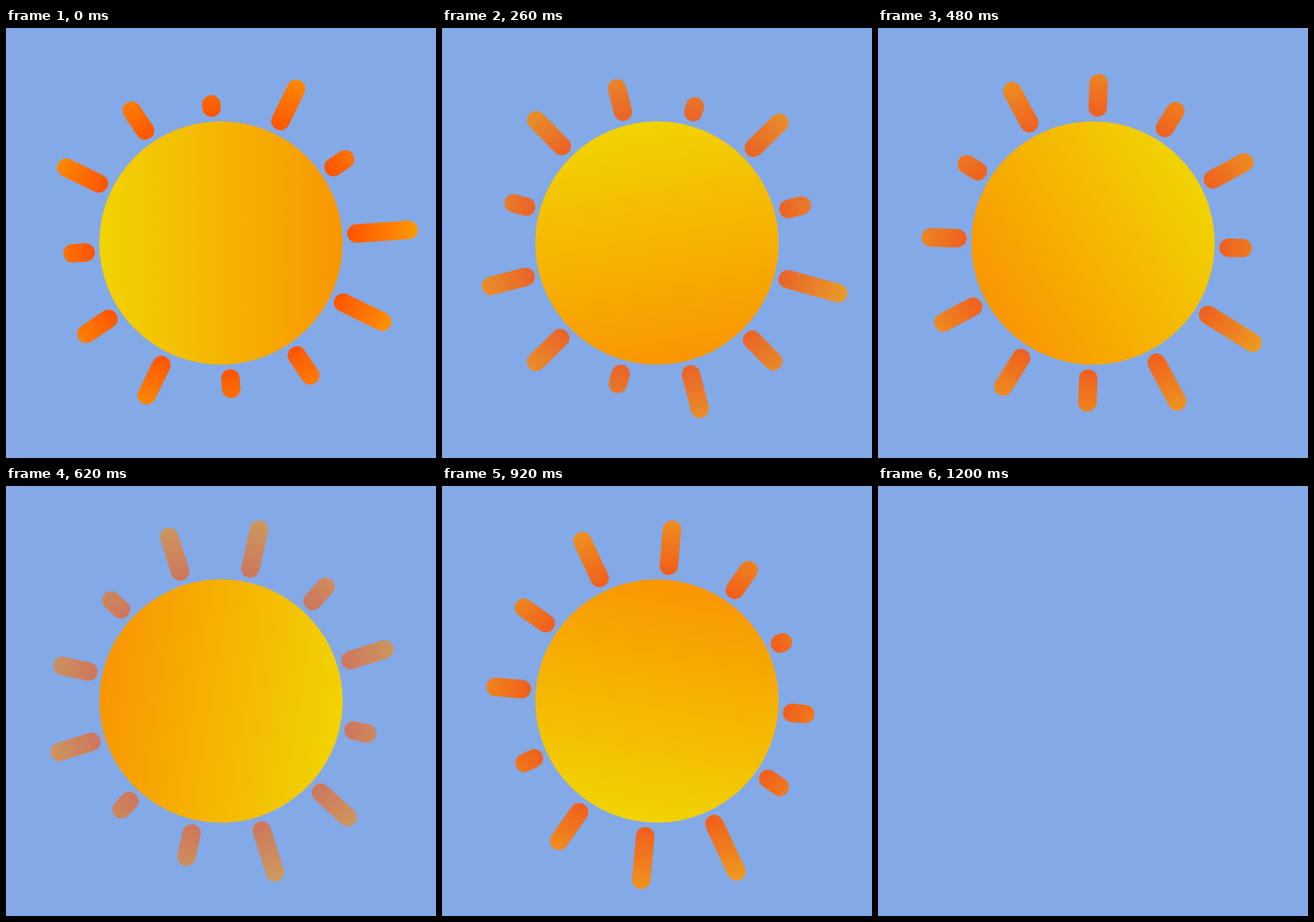
Write an HTML page with a canvas that moves like this. It is 500x500 px and loops after 1220 ms.

```html
<!DOCTYPE html>
<html lang="en">
<head>
<meta charset="utf-8">
<title>Spinning sun</title>
<style>
  html, body { margin: 0; height: 100%; overflow: hidden; background: #84a9e7; }
  canvas { display: block; width: 500px; height: 500px; }
</style>
</head>
<body>
<canvas id="stage" width="500" height="500"></canvas>
<script>
const ctx = document.getElementById('stage').getContext('2d');
const LOOP = 1220, STEP = 20, HIDE_AT = 1200;
const DISC = 141.5, RAY_START = 157.8, RAY_WIDTH = 21.5;
const rad = degrees => degrees * Math.PI / 180;

// Resting length, then pulses: start ms, duration ms, change in length, stay at peak
const rays = [
  { rest: 61, pulses: [[490, 265, -19]] },
  { rest: 51, pulses: [[60, 400, -16]] },
  { rest: 27.8, pulses: [[140, 340, 17], [695, 340, 17]] },
  { rest: 12.3, pulses: [[300, 340, 27]] },
  { rest: 39.3, pulses: [[810, 340, -12]] },
  { rest: 31, pulses: [[175, 305, 18]] },
  { rest: 15.3, pulses: [[770, 380, 36, true]] },
  { rest: 42.3, pulses: [] },
  { rest: 28, pulses: [[505, 410, 31]] },
  { rest: 3.8, pulses: [[160, 760, 20.5]] },
  { rest: 41.7, pulses: [[700, 400, -27]] },
  { rest: 16.3, pulses: [[630, 295, 36]] }
];
const fades = [[0, 1], [260, .83], [480, .87], [620, .6], [780, 1], [920, .88], [1200, .85]];

function pulse(t, [start, duration, amount, stay]) {
  const u = Math.min(Math.max((t - start) / duration, 0), stay ? .5 : 1);
  return amount * Math.sin(Math.PI * u) ** 2;
}

function fadeAt(t) {
  const i = fades.findIndex(([time]) => time > t);
  const [t0, a] = fades[i - 1], [t1, b] = fades[i];
  return a + (b - a) * (t - t0) / (t1 - t0);
}

function withStops(gradient, from, to) {
  gradient.addColorStop(0, from);
  gradient.addColorStop(1, to);
  return gradient;
}

const discFill = withStops(ctx.createLinearGradient(-DISC, 0, DISC, 0), '#f1d302', '#f99602');
const rayFill = withStops(ctx.createRadialGradient(0, 0, 150, 0, 0, 230), '#ff5600', '#fc9a04');

function drawDisc(t) {
  ctx.save();
  ctx.rotate(rad(t * .305));
  ctx.fillStyle = discFill;
  ctx.beginPath();
  ctx.arc(0, 0, DISC, 0, 2 * Math.PI);
  ctx.fill();
  ctx.restore();
}

function drawRays(t) {
  ctx.save();
  ctx.rotate(rad(t * .075 - 4));
  ctx.globalAlpha = fadeAt(t);
  ctx.strokeStyle = rayFill;
  ctx.lineWidth = RAY_WIDTH;
  ctx.lineCap = 'round';
  for (const { rest, pulses } of rays) {
    const length = pulses.reduce((sum, p) => sum + pulse(t, p), rest);
    ctx.beginPath();
    ctx.moveTo(RAY_START, 0);
    ctx.lineTo(RAY_START + length, 0);
    ctx.stroke();
    ctx.rotate(rad(30));
  }
  ctx.restore();
}

function draw(now) {
  const t = Math.floor(now % LOOP / STEP) * STEP;
  ctx.fillStyle = '#84a9e7';
  ctx.fillRect(0, 0, 500, 500);
  if (t < HIDE_AT) {
    ctx.save();
    ctx.translate(250, 250);
    drawRays(t);
    drawDisc(t);
    ctx.restore();
  }
}

let began;
function tick(now) {
  began ??= now;
  draw(now - began);
  requestAnimationFrame(tick);
}
draw(0);
requestAnimationFrame(tick);
</script>
</body>
</html>
```
